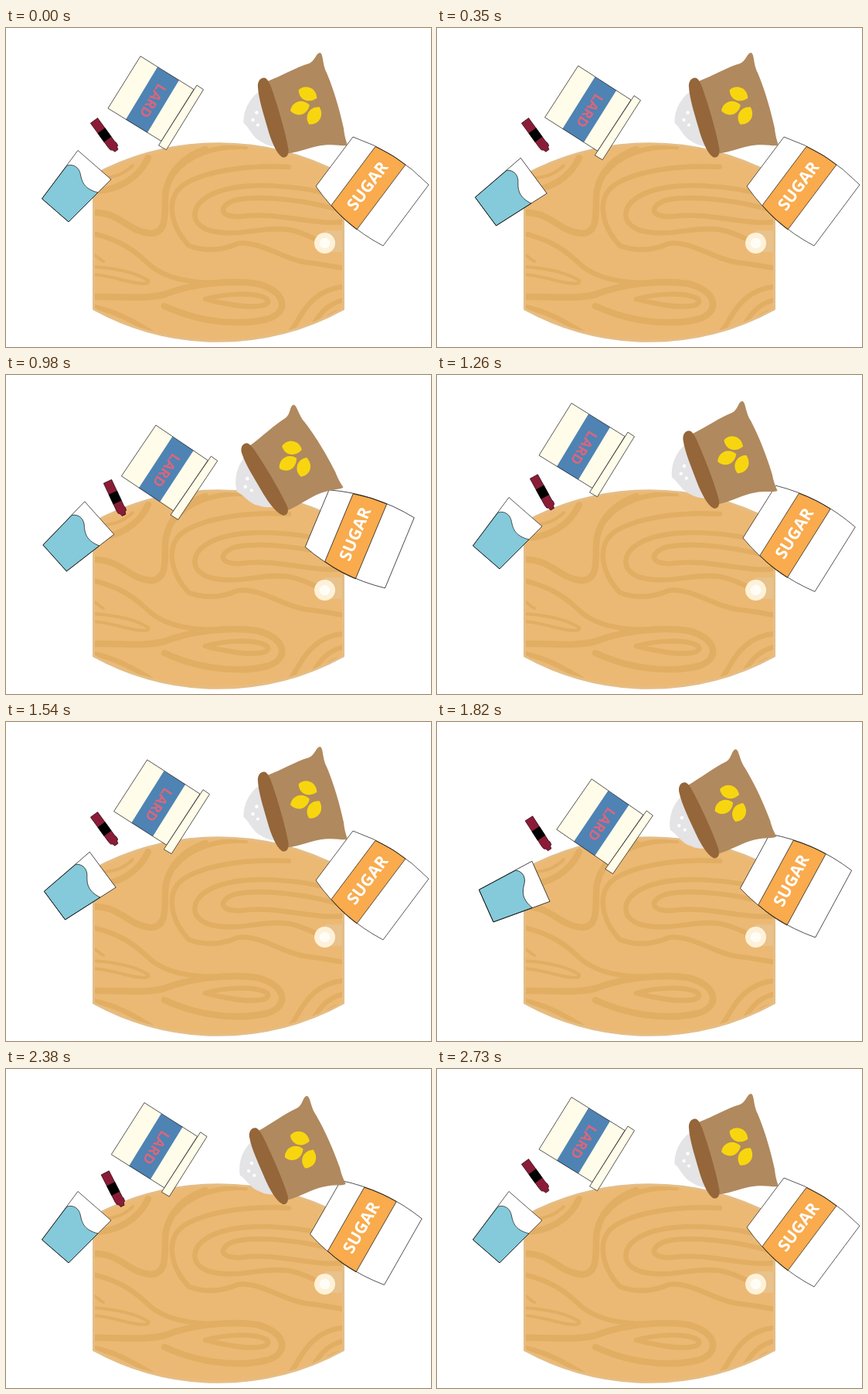
Recreate the animation shown at these times as an HTML page. Size 550 px wide and 413 px high, loop 2940 ms.

```html
<!DOCTYPE html>
<html lang="en">
<head>
<meta charset="utf-8">
<title>Baking ingredients</title>
<style>
  html, body { margin: 0; width: 100%; height: 100%; overflow: hidden; background: #fff; }
  svg { display: block; width: 550px; height: 413px; }
  text { font-family: "Open Sans", "Noto Sans", sans-serif; font-weight: 700; text-anchor: middle; }
  .line { stroke: #111; stroke-width: .7; stroke-linejoin: round; }
  .grain { fill: none; stroke: #e1ae63; stroke-width: 6.5; stroke-linecap: round; stroke-linejoin: round; }
  .thin { stroke-width: 4; }
  .wide { stroke-width: 8.5; }
</style>
</head>
<body>
<svg viewBox="0 0 550 413">
  <defs>
    <path id="plank" d="M113.500 190.500A340 340 0 0 1 436.500 190.500V364A336 336 0 0 1 113.500 364Z"/>
    <clipPath id="inside"><path d="M115 191A340 340 0 0 1 435.500 191V363A336 336 0 0 1 115 363Z"/></clipPath>
    <path id="grainLeaf" d="M-13 0C-9 -10 6 -13 13 0C6 12 -8 11 -13 0Z"/>
  </defs>

  <g id="board">
    <use href="#plank" fill="#ecb974"/>
    <g clip-path="url(#inside)">
      <path class="grain wide" d="M113 211C145 211 172 194 184 168"/>
      <path class="grain thin" d="M124 194C140 194 154 188 164 178"/>
      <path class="grain wide" d="M113 239C148 238 158 264 187 266C213 265 203 231 207 210C212 186 230 166 258 157"/>
      <path class="grain" d="M219 187C236 164 272 152 310 154"/>
      <path class="grain" d="M113 266C140 273 160 282 182 303C204 325 243 332 282 329"/>
      <path class="grain" d="M366 180C318 177 262 184 233 201C206 217 211 253 235 280"/>
      <path class="grain" d="M237 282C262 291 284 286 300 279C330 275 358 300 392 304C411 306 424 309 437 311"/>
      <path class="grain" d="M437 220C383 203 306 197 267 215C238 229 237 253 263 262C300 272 332 256 366 261C398 267 412 284 437 287"/>
      <path class="grain" d="M437 237C393 224 330 215 296 223C273 231 277 246 304 244C347 237 399 256 437 251"/>
      <path class="grain thin" d="M113 293C119 296 121 300 126 302"/>
      <path class="grain thin" d="M113 309C141 311 168 316 184 327C187 333 170 331 154 327C140 323 128 320 113 319"/>
      <path class="grain wide" d="M113 348C146 347 176 352 205 345C240 331 290 326 325 331C362 340 368 368 338 377C297 387 246 379 205 360"/>
      <path class="grain" d="M258 351C282 344 322 341 338 351C346 363 309 362 286 357C274 355 265 353 258 351Z"/>
      <path class="grain" d="M113 361C140 366 164 379 188 394"/>
      <path class="grain" d="M437 335C404 338 389 359 379 376C373 388 367 394 361 402"/>
      <path class="grain" d="M437 352C414 357 402 374 392 396"/>
      <path class="grain thin" d="M437 366C424 367 415 373 409 384"/>
    </g>
    <rect x="412" y="262" width="25" height="28" fill="#e8c18b"/>
    <use href="#plank" fill="none" stroke="#e4bd86" stroke-width="3" stroke-linejoin="round"/>
    <circle cx="412.500" cy="278.500" r="13.500" fill="#fdf2d9"/>
    <circle cx="412.500" cy="278.500" r="6.800" fill="#fffdf6"/>
  </g>

  <g id="cup">
    <path fill="#fff" d="M93 158.500L136 196L81 251L46.500 221Z"/>
    <path class="line" fill="#84cada" d="M79 178C88 175.500 95 181 96.500 190C98.500 201 103 209 119 213L81 251L46.500 221Z"/>
    <path class="line" fill="none" d="M93 158.500L136 196L81 251L46.500 221Z"/>
  </g>

  <g id="vanilla">
    <g transform="translate(127.500 138.500) rotate(54)">
      <path fill="#8b1c38" stroke="#2a0710" stroke-width=".7" d="M-23 -5.700H15L17 -6.500L21 -6L22 -4L25.500 -3V2L22 3L20.500 5L17 5.700H-23Z"/>
      <rect x="-7" y="-6" width="14" height="12"/>
    </g>
  </g>

  <g id="lard">
    <path fill="#fffce9" d="M174 36.500L243 79.500L201 146.500L132 104Z"/>
    <path fill="#4e83b4" d="M196 50.500L224 67.500L183 135.500L155 118.500Z"/>
    <path class="line" fill="none" d="M174 36.500L243 79.500L201 146.500L132 104Z"/>
    <path class="line" fill="#fffce9" d="M247 74L255.500 79.700L207.500 157.700L197.500 152Z"/>
    <text transform="translate(190 94.500) rotate(122)" y="6.400" font-size="18" fill="#da667c">LARD</text>
  </g>

  <g id="sugar">
    <path fill="#fff" d="M449 141Q505 160 547 203L488 282Q435 254 401 205Z"/>
    <path class="line" fill="#f9ab4d" d="M478 153.500Q499 163 517 177L454 261Q436 248 421 229.500Z"/>
    <path class="line" fill="none" d="M449 141Q505 160 547 203L488 282Q435 254 401 205Z"/>
    <text transform="translate(467.500 204.500) rotate(-53)" y="7.600" font-size="21.500" fill="#fff">SUGAR</text>
  </g>

  <g id="flour">
    <path fill="#e4e3e5" d="M331 80C317 88 307 105 307.500 123C315 129 319 142 330 147C337 152 344 153 352 154Z"/>
    <g fill="#fff">
      <circle cx="324.500" cy="109.500" r="2.300"/>
      <circle cx="319.500" cy="119" r="2.200"/>
      <circle cx="326" cy="125.500" r="2.100"/>
    </g>
    <path fill="#b0895e" d="M336 70C359 61 375 51 392 46C400 43 401 32 406.500 32C411 34 409 46 415 58C425 82 432 107 437 130C438 140 440 146 442 151.500C437 154 428 150 413 151.500C396 153 383 160 362 163Z"/>
    <path fill="#94663a" d="M326 77C325 69 330 63 336 65C341 68 344 79 348 91C355 113 362 137 365.500 157C366 165 363 168 358 167.500C350 163 343 146 338 128C333 110 327 92 326 77Z"/>
    <g fill="#f7d610">
      <use href="#grainLeaf" transform="translate(390.500 85.500) rotate(24)"/>
      <use href="#grainLeaf" transform="translate(380.500 103.500) rotate(-17)"/>
      <use href="#grainLeaf" transform="translate(399 113.500) rotate(-59)"/>
    </g>
  </g>
</svg>
<script>
const STEP = 70, LOOP = 2940, LAST = 38;
const RISE = 8, FALL = 7, CYCLE = 17;

// pivot, shift and turn at the far end of the swing, delay in steps
const parts = [
  { id: "cup",     x: 89,     y: 206.5,  dx: 10,    dy: 15.5, turn: 25,    delay: 0 },
  { id: "lard",    x: 194,    y: 97,     dx: 30.8,  dy: 51,   turn: 3.8,   delay: 2 },
  { id: "sugar",   x: 471.25, y: 207.75, dx: -17.8, dy: .3,   turn: -16.6, delay: 4 },
  { id: "flour",   x: 385.25, y: 104,    dx: -18.2, dy: 11.2, turn: -17,   delay: 4 },
  { id: "vanilla", x: 127.5,  y: 138.5,  dx: 15.7,  dy: 23,   turn: 12.5,  delay: 6 }
];
for (const p of parts) p.el = document.getElementById(p.id);

// linear out and back, twice per loop
function swing(step) {
  if (step < 0 || step >= 2 * CYCLE) return 0;
  const s = step % CYCLE;
  return s < RISE ? s / RISE : Math.max(0, 1 - (s - RISE) / FALL);
}

function draw(time) {
  const step = Math.min(LAST, Math.max(0, Math.floor(time / STEP) - 1));
  for (const p of parts) {
    const a = swing(step - p.delay);
    p.el.setAttribute("transform",
      `translate(${p.dx * a} ${p.dy * a}) rotate(${p.turn * a} ${p.x} ${p.y})`);
  }
}

const start = performance.now();
function tick() {
  draw((performance.now() - start) % LOOP);
  requestAnimationFrame(tick);
}
tick();
</script>
</body>
</html>
```
